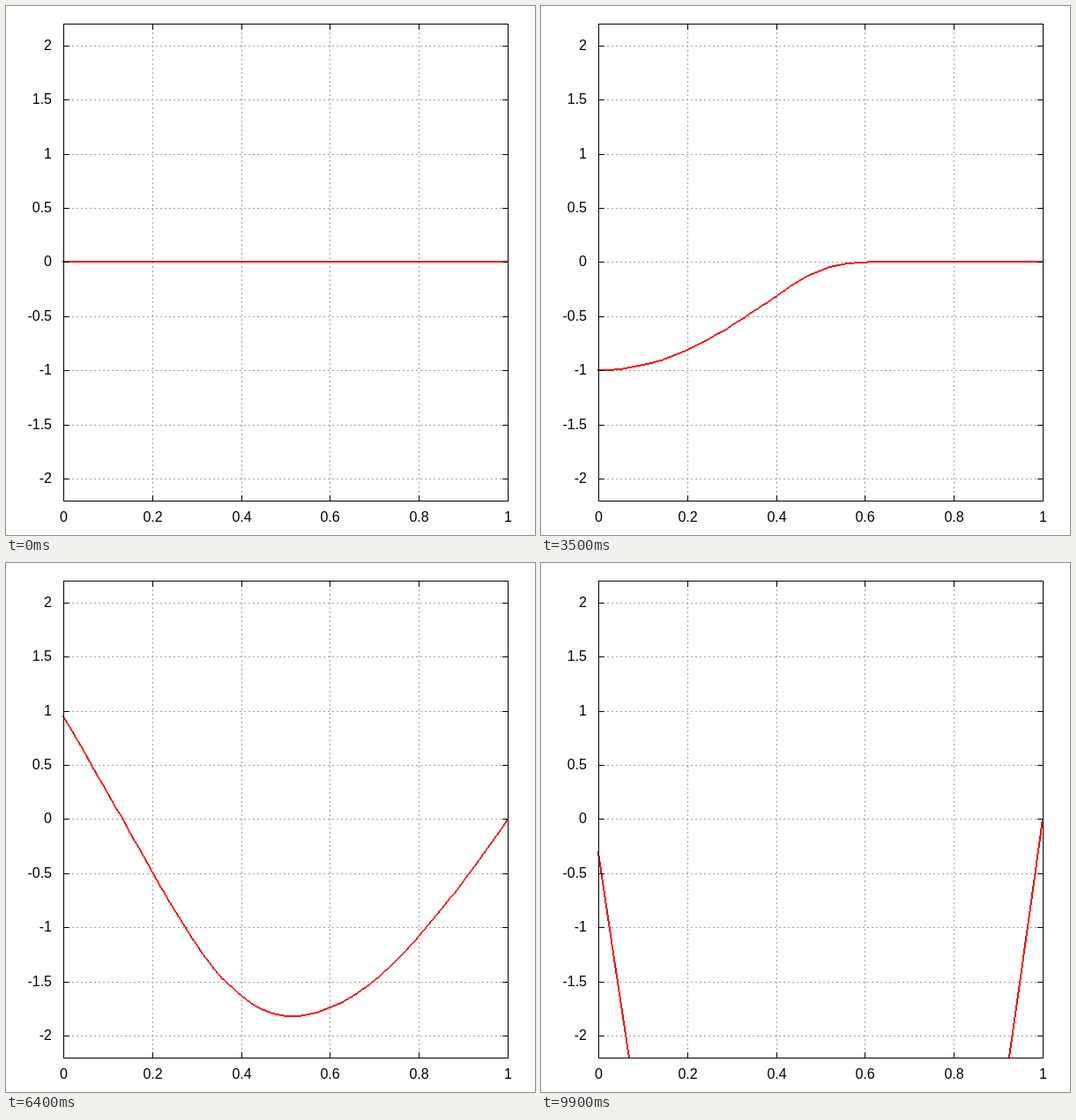
Recreate the animation shown at these times as an HTML page with a canvas. Size 600 by 600 pixels, loop 10 s.

```html
<!DOCTYPE html>
<html lang="en">
<head>
<meta charset="utf-8">
<title>Driven string</title>
<style>
  html, body { margin: 0; width: 100%; height: 100%; overflow: hidden; background: #fff; }
  canvas { display: block; }
</style>
</head>
<body>
<canvas id="stage" width="600" height="600"></canvas>
<script>
const ctx = document.getElementById('stage').getContext('2d');
const LEFT = 65, RIGHT = 569, TOP = 20, BOTTOM = 561;
const FRAMES = 100, FRAME_MS = 100;
const toX = v => Math.round(LEFT + v * (RIGHT - LEFT));
const toY = v => Math.round(290.49 - v * (BOTTOM - TOP) / 4.4);
const xTicks = [0, 0.2, 0.4, 0.6, 0.8, 1];
const yTicks = [-2, -1.5, -1, -0.5, 0, 0.5, 1, 1.5, 2];

// Slightly damped wave equation: left end driven by sin(pi t), right end fixed.
function simulate() {
  const cells = 200, h = 1 / cells, dt = h / 2, damping = 0.001;
  const stepsPerFrame = Math.round(0.1 / dt);
  const shapes = [];
  let old = new Float64Array(cells + 1), u = old.slice(), next = old.slice();
  const bend = (a, i) => a[i - 1] - 2 * a[i] + a[i + 1];
  for (let n = 0; n < FRAMES * stepsPerFrame; n++) {
    if (n % stepsPerFrame === 0) shapes.push(u.filter((_, i) => i % 2 === 0));
    for (let i = 1; i < cells; i++) {
      const now = bend(u, i), rate = (now - bend(old, i)) / dt;
      next[i] = 2 * u[i] - old[i] + (now + damping * rate) * (dt / h) ** 2;
    }
    next[0] = Math.sin(Math.PI * (n + 1) * dt);
    [old, u, next] = [u, next, old];
  }
  return shapes;
}

function line(x1, y1, x2, y2) {
  ctx.beginPath();
  ctx.moveTo(x1, y1);
  ctx.lineTo(x2, y2);
  ctx.stroke();
}

function drawGrid() {
  ctx.strokeStyle = '#a0a0a0';
  ctx.setLineDash([2, 3]);
  for (const v of yTicks) line(LEFT, toY(v) + 0.5, RIGHT, toY(v) + 0.5);
  for (const v of xTicks.slice(1, -1)) line(toX(v) + 0.5, BOTTOM + 1, toX(v) + 0.5, TOP);
  ctx.setLineDash([]);
}

function drawAxes() {
  ctx.strokeStyle = ctx.fillStyle = '#000';
  ctx.font = '16px "Liberation Sans", Arial, sans-serif';
  ctx.strokeRect(LEFT + 0.5, TOP + 0.5, RIGHT - LEFT, BOTTOM - TOP);
  ctx.textAlign = 'right';
  for (const v of yTicks) {
    const y = toY(v);
    line(LEFT, y + 0.5, LEFT + 7, y + 0.5);
    line(RIGHT - 6, y + 0.5, RIGHT, y + 0.5);
    ctx.fillText(v, 52, y + 5);
  }
  ctx.textAlign = 'center';
  for (const v of xTicks) {
    const x = toX(v);
    line(x + 0.5, TOP, x + 0.5, TOP + 7);
    line(x + 0.5, BOTTOM - 6, x + 0.5, BOTTOM);
    ctx.fillText(v, x + 0.5, 585);
  }
}

// Two-pixel stroke without smoothing, widened across the main direction.
function drawSegment(x1, y1, x2, y2) {
  const dx = x2 - x1, dy = y2 - y1;
  const steep = Math.abs(dy) > Math.abs(dx);
  const count = Math.max(Math.abs(dx), Math.abs(dy));
  for (let i = 0; i <= count; i++) {
    const x = Math.round(x1 + dx * i / count), y = Math.round(y1 + dy * i / count);
    if (y < TOP || y > BOTTOM) continue;
    if (steep) ctx.fillRect(x - 1, y, 2, 1);
    else ctx.fillRect(x, y - 1, 1, 2);
  }
}

function drawCurve(shape) {
  ctx.fillStyle = '#f00';
  const last = shape.length - 1;
  ctx.fillRect(LEFT - 1, toY(shape[0]) - 1, 1, 2);
  for (let i = 0; i < last; i++) {
    drawSegment(toX(i / last), toY(shape[i]), toX((i + 1) / last), toY(shape[i + 1]));
  }
}

const shapes = simulate();
const start = performance.now();

function draw() {
  const frame = Math.floor((performance.now() - start) / FRAME_MS) % FRAMES;
  ctx.fillStyle = '#fff';
  ctx.fillRect(0, 0, 600, 600);
  drawGrid();
  drawCurve(shapes[frame]);
  drawAxes();
  requestAnimationFrame(draw);
}
draw();
</script>
</body>
</html>
```
